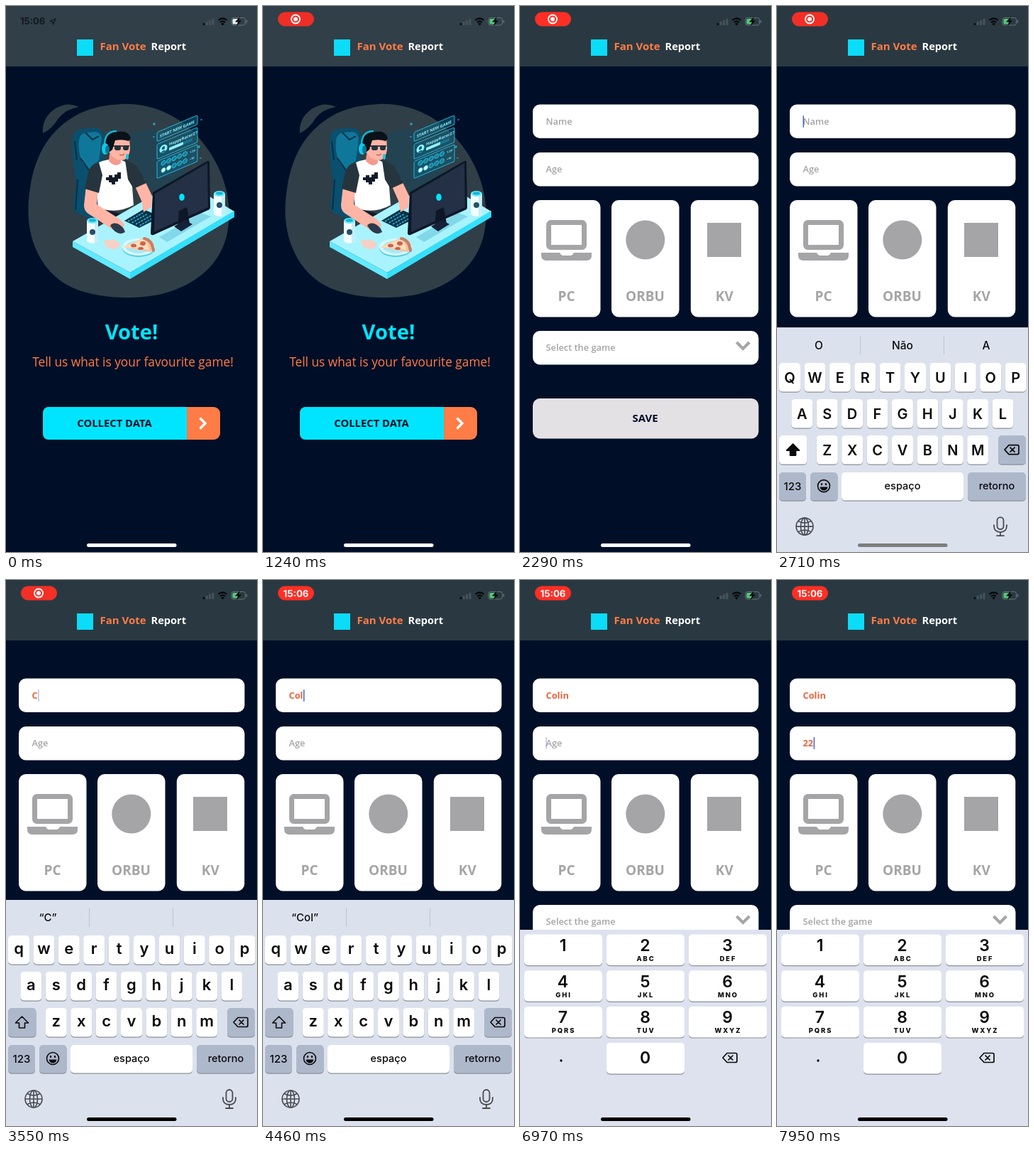
Write an HTML page that moves like this. It is 354x768 px and loops after 8 s.

```html
<!DOCTYPE html>
<html lang="en">
<head>
<meta charset="utf-8">
<title>Survey app</title>
<style>
html, body { margin: 0; width: 100%; height: 100%; overflow: hidden; background: #000f27; }
svg { display: block; width: 100vw; height: 100vh; }
text { font-family: "Open Sans", sans-serif; white-space: pre; }
.ios text { font-family: Inter, sans-serif; }
</style>
</head>
<body>
<svg id="stage" viewBox="0 0 354 768" preserveAspectRatio="xMidYMid meet"></svg>
<script>
const NAVY = '#000f27', CYAN = '#00e5ff', ORANGE = '#ff7c47', GREY = '#a5a4a6';
const LOOP = 8000;

const rect = (x, y, w, h, r, fill, extra = '') =>
  `<rect x="${x}" y="${y}" width="${w}" height="${h}" rx="${r}" fill="${fill}" ${extra}/>`;
const text = (x, y, s, size, fill, weight = 700, extra = '') =>
  `<text x="${x}" y="${y}" font-size="${size}" fill="${fill}" font-weight="${weight}" ${extra}>${s}</text>`;
const mid = (x, y, s, size, fill, weight, extra = '') =>
  text(x, y, s, size, fill, weight, `text-anchor="middle" ${extra}`);
const path = (d, fill, extra = '') => `<path d="${d}" fill="${fill}" ${extra}/>`;
const line = (d, stroke, w, extra = '') =>
  `<path d="${d}" fill="none" stroke="${stroke}" stroke-width="${w}" ${extra}/>`;
const oval = (x, y, rx, ry, fill, extra = '') =>
  `<ellipse cx="${x}" cy="${y}" rx="${rx}" ry="${ry}" fill="${fill}" ${extra}/>`;
const group = (id, body, extra = '') => `<g id="${id}" ${extra}>${body}</g>`;
const ROUND = 'stroke-linecap="round" stroke-linejoin="round"';

// ---------- app screens ----------
const header = fill => rect(0, 0, 354, 85, 0, fill) + rect(100, 47, 23, 23, 0, '#0bdcf8') +
  text(132.5, 62, 'Fan Vote', 15, ORANGE) + text(204.5, 62, 'Report', 14.6, '#fff');

function can(x, y) {
  return path(`M${x - 8} ${y - 12}v29q8 6 16 0v-29z`, '#f4fdff') +
    path(`M${x + 3} ${y - 12}v31q3 0 5-3v-28z`, '#c5eef6') +
    oval(x, y - 12, 8, 4, '#6eeaff') + oval(x, y - 12.5, 5, 2.2, '#18b6d2') +
    `<circle cx="${x}" cy="${y + 4}" r="4" fill="#24516a"/>`;
}

function hologram() {
  let dots = '';
  for (let i = 0; i < 10; i++) {
    const c = i % 5, r = i / 5 | 0;
    dots += `<circle cx="${10 + c * 7.6}" cy="${47 + r * 10}" r="3" fill="${i > 4 && c < 2 ? '#dffbff' : '#137f9d'}" stroke="#35cfea" stroke-width=".8"/>`;
  }
  const box = (y, h) => rect(1, y, 57, h, 2, '#0d5f7d', 'fill-opacity=".55" stroke="#22b8d8" stroke-width="1"');
  return `<g transform="matrix(1 -.42 0 1 212 178)">` +
    box(0, 13) + text(5, 9.3, 'START NEW GAME', 5.6, '#8ff3ff') +
    box(17, 21) + `<circle cx="10" cy="27" r="5.5" fill="#8ff3ff"/><circle cx="10" cy="26" r="2.2" fill="#0d5f7d"/>` +
    path('M6 32q4-5 8 0z', '#0d5f7d') +
    text(18, 26, 'HappyRacer27', 5.6, '#8ff3ff') + rect(18, 29, 33, 4, 1, '#157694') + rect(18, 29, 20, 4, 1, '#8ff3ff') +
    box(41, 24) + dots + text(47, 49, '1.2K', 3.8, '#8ff3ff') + text(47, 59, '+10', 3.8, '#8ff3ff') + '</g>' +
    line('M209 164v4m-2-2h4M272 196v4m-2-2h4M207 184h3M274 160h3M273 214h3', '#28b9d6', 1.2);
}

function keyboardProp() {
  let rows = '';
  for (let i = 0; i < 4; i++)
    rows += line(`M${172 + i * 5.5} ${303 + i * 2}l22-12.5`, '#27b9d6', 1.6, 'stroke-dasharray="3 1.3"');
  return path('M167 302l27-16 14 6v10l-20 10z', '#083148') + rows;
}

const SKIN = '#ffb5a5', SLEEVE = '#26343d';

const chair =
  path('M94 190q0-15 11-17l21-2q10 1 12 11v62l-8 60-32-14q-3-2-3-8l4-36q-6-27-5-56z', '#0a4f6d') +
  path('M103 188q2-9 10-10l13-1q8 1 9 10l-4 30-13 14-10-10q-7-15-5-33z', '#0f789a') +
  line('M97 190l3 27M101 244l-3 43M112 178l10 10 9-5M105 214l13 18', '#063048', 2);

const torso =
  path('M126 282l42 12v20l-40-12z', '#111d2d') +
  path('M131 220q13-6 29-4 13 3 16 12l4 52q-23 13-50 4l-4-42z', '#fff') +
  path('M141 241h4v-3h5v3h3v-4h4v-3h5v9h-4v4h-4v4h-5v-3h-4v-3h-4z', '#101b28');

const head =
  path('M146 208l16 5v8q-8 7-17-3z', '#f39c8d') +
  path('M143 186q13-8 31-1l1 15q-1 17-13 17-14-2-19-17z', SKIN) +
  path('M140 197q-1-19 17-20 16-3 19 9l-3 4q-8-3-19-1l-4 13-5 4q-4-4-5-9z', '#0b1119') +
  line('M150 197h24', '#0b1119', 1.5) + rect(153, 196, 9, 7, 3, '#20323d') + rect(165, 196, 8, 7, 3, '#20323d') +
  line('M160 209q4 2 7-1', '#b85c58', 1.2) +
  line('M139 198q-1-22 17-22', '#0eb6d6', 2.5) + oval(140, 201, 5, 8, '#15c6e4') + oval(143, 202, 3, 6, '#087796') +
  oval(171, 212, 2, 4, '#15c6e4');

const arms =
  path('M113 253l17 6-2 20 28 18q7 4 11 11l-6 8q-9 1-16-5l-29-19q-6-4-6-12z', SKIN) +
  path('M131 220q-11 1-15 14l-5 23 20 6 5-25z', SLEEVE) +
  path('M147 309q3-5 10-3 9 4 11 12-11 7-21-9z', '#2b3b4b') +
  path('M179 247l15-5 12 25-1 16-11 7-3-16z', SKIN) +
  path('M168 217q13 2 20 14l10 18-18 8-8-13z', SLEEVE);

const desk =
  path('M94 331l153-87 75 45-147 86z', '#a9f3ff') +
  path('M94 331l81 44v9l-81-45z', '#62eaff') + path('M175 375l147-87v9l-147 87z', '#35dffa') +
  path('M216 325l59-34 14 5-62 36z', '#73ccdf', 'opacity=".7"');

const gear =
  // monitor
  path('M207 262l77-44q3-1 3 2l1 63q0 3-3 4l-77 35q-4 1-4-3z', '#0d1728') +
  path('M210 264l74-43 1 62-76 35z', '#233046') + oval(248, 269, 3.8, 5, CYAN) +
  path('M244 288l11-5 4 23-17 8z', '#0d1728') + path('M237 310l15-9 11 6-16 10z', '#142138') +
  // food
  oval(187, 341, 23, 12, '#54cfe5') + oval(187, 339, 23, 12, '#d9faff') + oval(187, 339, 18, 9, '#a8e9f5') +
  path('M165 339l30-13q10 0 14 10l-4 10z', '#f3c1a0') + path('M165 339l28-11q7 2 9 15z', '#ffddb5') +
  line('M195 327q11 2 13 17', '#c77f64', 4, ROUND) +
  oval(180, 337, 4, 2.5, '#d0604f') + oval(193, 334, 4, 3, '#d0604f') + oval(190, 341, 4, 2, '#d0604f') +
  path('M138 331q5-5 9-1 6-4 8 1 7 0 5 6-1 5-9 5-12-1-13-11z', '#f6d0c4') +
  can(122, 314) + can(301, 276);

const art =
  path('M163 138C210 136 246 158 268 181C299 214 318 258 314 305C310 357 274 391 220 405C176 415 113 411 79 388C43 363 28 318 32 273C37 214 59 174 104 151Q130 139 163 138z', '#303e47') +
  path('M52 179Q50 157 70 144Q87 134 103 142Q84 145 74 158Q65 173 52 179z', '#303e47') +
  path('M176 178l32-6 50 66-49 25-32-40z', '#0c4e68', 'opacity=".35"') +
  chair + torso + head + desk + keyboardProp() + arms + hologram() + gear;

const welcome = rect(0, 0, 354, 768, 0, NAVY) + header('#303f48') + art +
  mid(177, 468.5, 'Vote!', 29.2, CYAN) +
  mid(179, 507, 'Tell us what is your favourite game!', 17.3, ORANGE, 400) +
  rect(52, 564, 250, 46, 9, ORANGE) + path('M61 564h194v46h-194q-9 0-9-9v-28q0-9 9-9z', CYAN) +
  mid(153, 592, 'COLLECT DATA', 14.8, NAVY) +
  line('M273.500 579.500l7.500 7.500-7.500 7.500', '#fff', 3.4);

const field = (y, h = 47.5, fill = '#fff') => rect(18, y, 318.5, h, 10, fill);
const card = (x, label) => rect(x, 273, 95.5, 164.5, 10, '#fff') + mid(x + 47.5, 415, label, 19, GREY);

const form = rect(0, 0, 354, 768, 0, NAVY) + header('#2a3941') +
  field(138.5) + field(206) +
  '<text id="name" x="36.500" y="167" font-size="12.800" font-weight="700"></text>' +
  '<text id="age" x="36.500" y="234.300" font-size="12.800" font-weight="700"></text>' +
  rect(36.5, 154, 1.5, 17, .7, '#4667cf', 'id="caret"') +
  card(18, 'PC') + card(129, 'ORBU') + card(240.8, 'KV') +
  rect(40.5, 304.5, 50, 35, 3, 'none', `stroke="${GREY}" stroke-width="7"`) +
  path('M30 347h26q2 4 5 4h10q3 0 5-4h25v4q0 7-7 7h-57q-7 0-7-7z', GREY) +
  `<circle cx="176.800" cy="329" r="27.500" fill="${GREY}"/>` + rect(264, 305, 48, 48, 0, GREY) +
  field(457) + text(36.5, 485, 'Select the game', 12.8, GREY, 600) +
  line('M305.500 473l9 9 9-9', GREY, 4) +
  field(552, 56.5, '#e4e1e5') + mid(176.7, 585, 'SAVE', 15, NAVY);

// ---------- keyboards ----------
const BLACK = '#0a0a0c', DARK = '#aeb8cb';
const key = (x, y, w, h, fill = '#fff') =>
  rect(x, y + 1.2, w, h, 5, '#8c9099') + rect(x, y, w, h, 5, fill);
const backspace = (x, y) =>
  line(`M${x - 10} ${y}l6-6.500h12q2 0 2 2v9q0 2-2 2h-12zM${x - 2} ${y - 3}l6 6m0-6l-6 6`, BLACK, 1.7, ROUND);

function letters(upper) {
  let s = '';
  ['qwertyuiop', 'asdfghjkl', 'zxcvbnm'].forEach((row, r) => {
    [...row].forEach((ch, i) => {
      const x = [3, 20.3, 55.8][r] + i * 35.4, y = 500 + r * 51;
      s += key(x, y, 30, 40.5) + (upper
        ? mid(x + 15, y + 27.5, ch.toUpperCase(), 20, BLACK, 600)
        : mid(x + 15, y + 26, ch, 22, BLACK, 600));
    });
  });
  return s + key(3, 602, 39.5, 40.5, upper ? '#fff' : DARK) +
    path('M22.500 614l9 9h-5v7h-8v-7h-5z', upper ? BLACK : 'none', `stroke="${BLACK}" stroke-width="1.6" stroke-linejoin="round"`);
}

const qwerty = rect(0, 450, 354, 318, 0, '#dce2ed') +
  line('M117.500 462v26M235.500 462v26', '#bec4cf', 1) +
  group('upper', letters(true) + mid(59, 480.5, 'O', 15.5, BLACK, 500) +
    mid(177, 480.5, 'Não', 15.5, BLACK, 500) + mid(295, 480.5, 'A', 15.5, BLACK, 500)) +
  group('lower', letters(false) +
    `<text id="hint" x="59" y="480" font-size="15" font-weight="500" text-anchor="middle" fill="${BLACK}"></text>`) +
  key(312, 602, 39, 40.5, DARK) + backspace(331, 622) +
  key(3, 654, 38, 39.5, DARK) + mid(22, 679, '123', 15, BLACK, 500) +
  key(47, 654, 38.5, 39.5, DARK) +
  `<circle cx="66" cy="673" r="8.500" fill="none" stroke="${BLACK}" stroke-width="1.600"/>` +
  oval(63, 670.5, 1.2, 1.7, BLACK) + oval(69, 670.5, 1.2, 1.7, BLACK) + path('M60.500 674.500h11q-1 5-5.500 5t-5.500-5z', BLACK) +
  key(91, 654, 172, 39.5) + mid(177, 677.5, 'espaço', 14.5, BLACK, 500) +
  key(269, 654, 82, 39.5, DARK) + mid(310, 677.5, 'retorno', 14.5, BLACK, 500) +
  '<g fill="none" stroke="#484b53" stroke-width="1.600"><circle cx="39" cy="730" r="12"/><ellipse cx="39" cy="730" rx="5.500" ry="12"/>' +
  '<path d="M27 730h24M39 718v24M30 722.500q9 5 18 0M30 737.500q9-5 18 0"/></g>' +
  rect(310.5, 717, 9, 17, 4.5, 'none', 'stroke="#484b53" stroke-width="1.800"') +
  line('M306 728v1q0 9 9 9t9-9v-1M315 738v5M310 743h10', '#484b53', 1.8, ROUND);

function keypad() {
  const labels = ['', 'ABC', 'DEF', 'GHI', 'JKL', 'MNO', 'PQRS', 'TUV', 'WXYZ'];
  let s = rect(0, 492, 354, 276, 0, '#dde2ee');
  labels.forEach((l, i) => {
    const x = 6 + i % 3 * 116, y = 498.5 + (i / 3 | 0) * 50.7;
    s += key(x, y, 110, 43.5) + mid(x + 54.5, y + 23.5, i + 1, 23, BLACK, 600) +
      mid(x + 55.5, y + 37.3, l, 9.4, BLACK, 800, 'letter-spacing="1.900"');
  });
  return s + key(122, 651, 110, 43.5) + mid(176.5, 680, '0', 23, BLACK, 600) +
    `<circle cx="58" cy="676" r="1.700" fill="${BLACK}"/>` + backspace(296, 672);
}

// ---------- system chrome ----------
const bars = [0, 1, 2, 3].map(i => rect(277.5 + i * 4.3, 24 - i * 2, 3, 3 + i * 2, .8, i ? '#46535b' : '#0b1014')).join('');
const status =
  group('clock', text(20, 26, '15:06', 13, '#11191f', 700) +
    line('M62 21.500l8-3.500-3.500 8-.8-3.700z', '#11191f', 1.2, 'stroke-linejoin="round"')) +
  group('pill', rect(21, 8.5, 51, 20, 10, '#ff2f25', 'id="pillBg"') +
    group('rec', '<circle cx="46" cy="18.500" r="6" fill="none" stroke="#fff" stroke-width="1.800"/><circle cx="46" cy="18.500" r="3" fill="#fff"/>') +
    group('recTime', mid(46.5, 23.5, '15:06', 13.2, '#fff', 700))) +
  bars + line('M299.500 20q6-5 12 0M302 23q3.500-3 7 0', '#05080a', 2.2) + path('M303 25q2.500-2 5 0l-2.500 2.500z', '#05080a') +
  rect(318, 16.5, 19.5, 10.5, 3, 'none', 'stroke="#66727a" stroke-width="1"') +
  rect(338.7, 19.7, 1.5, 4, .7, '#66727a') +
  rect(319.5, 18, 8.5, 7.5, 1.6, '#e9eef0', 'id="charge"') +
  path('M330 15l-7 7.500h4l-2 6 7-8h-4z', '#05080a');

const stage = document.getElementById('stage');
stage.innerHTML =
  group('welcome', welcome + rect(0, 0, 354, 768, 0, '#000', 'id="dim"')) +
  group('form', form) +
  group('qwerty', qwerty, 'class="ios"') + group('keypad', keypad(), 'class="ios"') +
  group('status', status, 'class="ios"') +
  rect(114, 756, 126.5, 5, 2.5, '#fff', 'id="home"');

// ---------- motion ----------
const el = {};
stage.querySelectorAll('[id]').forEach(n => el[n.id] = n);
const set = (id, name, v) => el[id].setAttribute(name, v);
const show = (id, on) => set(id, 'display', on ? 'inline' : 'none');
const clamp = v => Math.max(0, Math.min(1, v));
const spring = (ms, speed) => {
  const k = Math.max(0, ms) / 1000 * speed;
  return 1 - (1 + k) * Math.exp(-k);
};

const PUSH = 1240, FOCUS = 2380, SWAP = 6400;
const NAME = 'Colin', NAME_KEYS = [2980, 3620, 4130, 4830, 5620];
const AGE = '22', AGE_KEYS = [7130, 7720];
const typed = (s, times, t) => s.slice(0, times.filter(k => k <= t).length);

function fill(id, value, placeholder) {
  el[id].textContent = value || placeholder;
  set(id, 'fill', value ? '#ee633d' : GREY);
  set(id, 'font-weight', value ? 700 : 600);
}

function draw(t) {
  const push = spring(t - PUSH, 16.35), up = spring(t - FOCUS, 21.5);
  set('welcome', 'transform', `translate(${-106 * push} 0)`);
  set('dim', 'opacity', .1 * push);
  set('form', 'transform', `translate(${354 * (1 - push)} 0)`);

  const name = typed(NAME, NAME_KEYS, t), age = typed(AGE, AGE_KEYS, t);
  fill('name', name, 'Name');
  fill('age', age, 'Age');

  const onAge = t >= SWAP, active = onAge ? 'age' : 'name', value = onAge ? age : name;
  set('caret', 'x', 36.5 + (value ? el[active].getComputedTextLength() + .5 : 0));
  set('caret', 'y', onAge ? 221 : 154);
  const last = Math.max(...[FOCUS, SWAP, ...NAME_KEYS, ...AGE_KEYS].filter(k => k <= t), 0);
  const beat = (t - last) % 1000;
  set('caret', 'opacity', t < FOCUS ? 0 : 1 - clamp((beat - 500) / 120) + clamp((beat - 880) / 120));

  show('qwerty', t > FOCUS && !onAge);
  show('keypad', onAge);
  set('qwerty', 'transform', `translate(0 ${318 * (1 - up)})`);
  show('upper', !name);
  show('lower', name);
  el.hint.textContent = `“${name}”`;

  const recording = t >= 480, timeShown = t >= 3600;
  show('clock', !recording);
  show('pill', recording);
  show('rec', !timeShown);
  show('recTime', timeShown);
  set('pillBg', 'opacity', timeShown ? 1 : .94 - .06 * Math.cos((t - 1520) / 1600 * 2 * Math.PI));
  set('charge', 'fill', recording ? '#55c87a' : '#e9eef0');

  const shade = Math.round(255 * (1 - clamp((t - 2600) / 220)));
  set('home', 'fill', `rgb(${shade},${shade},${shade})`);
}

const start = performance.now();
function tick() {
  draw((performance.now() - start) % LOOP);
  requestAnimationFrame(tick);
}
tick();
</script>
</body>
</html>
```
